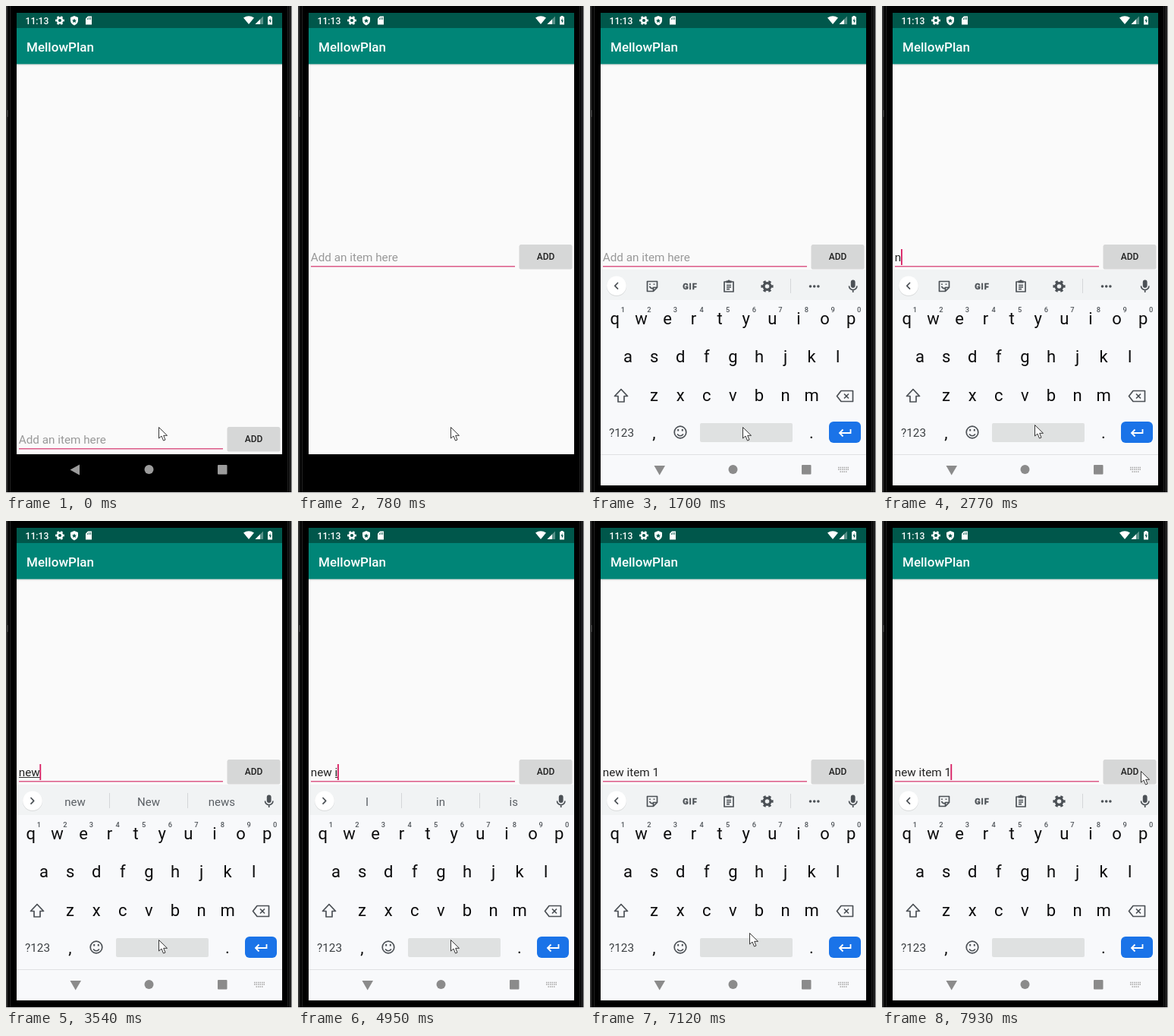
These frames come from a looping animation (377 px wide and 641 px high, 8 s). An HTML page:

```html
<!DOCTYPE html>
<html lang="en">
<head>
<meta charset="utf-8">
<title>Todo app</title>
<style>
html, body { margin: 0; width: 100%; height: 100%; overflow: hidden; background: #000; }
svg { display: block; width: 377px; height: 641px; font-family: Roboto, sans-serif; }
text { white-space: pre; }
.mid { text-anchor: middle; }
.bold { font-weight: 500; }
.line { fill: none; stroke: #4c5156; stroke-width: 1.7; stroke-linejoin: round; }
</style>
</head>
<body>
<svg viewBox="0 0 377 641">
  <defs>
    <linearGradient id="shade" x2="0" y2="1">
      <stop stop-color="#000" stop-opacity=".14"/><stop offset="1" stop-color="#000" stop-opacity="0"/>
    </linearGradient>
  </defs>

  <!-- phone body -->
  <rect width="377" height="641"/>
  <path d="M0 0H3V640H0zM373 0H377V640H373z" fill="#1e1e1e"/>
  <path d="M5.500 0V640M371.500 0V640" stroke="#222"/>
  <path d="M.5 0V640" stroke="#444"/>
  <path d="M376.500 0V640" stroke="#999"/>
  <rect y="137" width="3" height="9" fill="#3a3a3a"/>

  <!-- app -->
  <rect x="14" y="9" width="350" height="581" fill="#fafafa"/>
  <rect x="14" y="9" width="350" height="20" fill="#00574b"/>
  <rect x="14" y="29" width="350" height="47.500" fill="#008577"/>
  <rect x="14" y="76.500" width="350" height="2.500" fill="url(#shade)"/>
  <text x="27" y="60" font-size="17" class="bold" fill="#fff">MellowPlan</text>
  <g id="status" fill="#fff">
    <text x="25.500" y="23.700" font-size="12.200" class="bold">11:13</text>
    <path d="M90 13l5 2v4q0 4-5 6.500q-5-2.500-5-6.500v-4z"/>
    <path d="M90 16.500l1 1.900 2 .2-1.500 1.400.4 2.100-1.900-1.100-1.900 1.100.4-2.100-1.500-1.400 2-.2z" fill="#00574b"/>
    <path d="M108 13.500h5v11h-8v-8z"/>
    <path d="M107.500 16v2M109.500 15v3M111.500 15v3" stroke="#00574b" stroke-width=".8"/>
    <path d="M313 15.500q7-4.500 14 0l-7 8.500z"/>
    <path d="M339 13.500v10.500h-10.500z" opacity=".35"/>
    <path d="M335 17.500v6.500h-6.500z"/>
    <path d="M346.500 13h3v1.200h1.500v10.300h-6v-10.300h1.500z"/>
    <path d="M348.600 16l-2 3.800h1.300v3l2-3.800h-1.300z" fill="#00574b"/>
  </g>

  <!-- input row -->
  <g id="row">
    <path d="M17 342.800H286" stroke="#dc5a88" stroke-width="1.500"/>
    <text id="field" x="16.800" y="335.800" font-size="15.250"></text>
    <path id="under" stroke="#333"/>
    <rect id="caret" y="320" width="1.800" height="21" fill="#d81b60"/>
    <rect x="291.500" y="314.500" width="70" height="32" rx="2" fill="#000" opacity=".14"/>
    <rect x="292" y="314" width="69" height="32" rx="2" fill="#d6d7d7"/>
    <text x="326.500" y="334" font-size="12" class="mid bold" fill="#222">ADD</text>
  </g>

  <!-- dark navigation bar -->
  <rect x="14" y="590" width="350" height="50"/>
  <g id="nav" fill="#9c9c9c">
    <path id="back" d="M84.500 610.500L97 603.500V617.500z"/>
    <circle cx="188.500" cy="610" r="6"/>
    <rect x="279" y="604" width="12.500" height="12.500" rx="1"/>
    <path class="dots" stroke="#9c9c9c"/>
  </g>

  <!-- keyboard -->
  <g id="board">
    <rect x="14" y="347" width="350" height="284" fill="#f8f9fb"/>
    <rect x="14" y="347" width="350" height="40" fill="#f1f3f4"/>
    <rect x="14" y="590" width="350" height="1" fill="#e0e1e2"/>
    <circle cx="35" cy="369" r="13" fill="#000" opacity=".1"/>
    <circle cx="35" cy="368.300" r="12.800" fill="#fff"/>
    <path id="chevron" class="line"/>
    <g id="tools">
      <path class="line" d="M75.500 362.500H88.500V370.500L83.500 375.500H75.500zM88.500 370.500H83.500V375.500M78.500 369q2 4 5 2M79 365.500v1.500M84.500 365.500v1.500"/>
      <text x="132" y="372.500" font-size="11" font-weight="700" letter-spacing="1" class="mid" fill="#4c5156" stroke="#4c5156" stroke-width=".4">GIF</text>
      <path class="line" d="M177 363H189V376H177zM180 367.500H186M180 370H186M180 372.700H184"/>
      <path d="M179.500 361.500h2a1.600 1.600 0 0 1 3 0h2v3h-7z" fill="#4c5156"/>
      <path d="M264.500 359V378" stroke="#d4d6d8"/>
      <g fill="#4c5156"><circle cx="290.500" cy="369" r="1.800"/><circle cx="295.700" cy="369" r="1.800"/><circle cx="300.900" cy="369" r="1.800"/></g>
    </g>
    <g id="hints" font-size="15" class="mid" fill="#5a5f64">
      <path d="M136.500 358V378M239.500 358V378" stroke="#d4d6d8"/>
      <text x="91" y="374.500"></text><text x="188" y="374.500"></text><text x="284.300" y="374.500"></text>
    </g>
    <rect x="343.800" y="360.500" width="5.800" height="10.500" rx="2.900" fill="#4c5156"/>
    <path class="line" d="M341.500 368.500a5.200 5.200 0 0 0 10.400 0M346.700 373.500V377"/>
    <g id="keys" class="mid" fill="#0c0c0d"></g>
    <path class="line" d="M41 504.500L49.500 513.500H45V521H37V513.500H32.500z"/>
    <path class="line" d="M325.500 513.500L331 506.500H346.500V520.500H331zM335 510.500l6 6M341 510.500l-6 6"/>
    <circle class="line" cx="119" cy="561" r="7.800"/>
    <path class="line" d="M115 563.500q4 4.500 8 0"/>
    <path d="M116.200 557v2.600M121.800 557v2.600" stroke="#4c5156" stroke-width="2"/>
    <rect x="145" y="549" width="122" height="25" rx="2" fill="#dfe1e1"/>
    <rect x="315" y="547" width="42" height="28" rx="6" fill="#1a73e8"/>
    <path d="M343.500 557V562H329.500M333.500 557.500L329 562L333.500 566.500" fill="none" stroke="#fff" stroke-width="1.800"/>
    <g fill="#8b8b8b">
      <path d="M84.500 605H99L91.700 617.500z"/>
      <circle cx="188.500" cy="610" r="6"/>
      <rect x="279" y="604" width="12.500" height="12.500" rx="1"/>
      <path class="dots" stroke="#a4a4a4"/>
    </g>
  </g>

  <rect x="14" y="631" width="350" height="9"/>
  <rect y="640" width="377" height="1" fill="#e4e4e4"/>
  <path id="mouse" d="M.5 .5V15L4 12L6.500 18L9 17L6.700 11.300H11.500z" fill="#fff" stroke="#222" stroke-width=".9"/>
</svg>

<script>
const LOOP = 8000;
const $ = id => document.getElementById(id);
const set = (id, attrs) => {
  for (const k in attrs) $(id).setAttribute(k, attrs[k]);
};

function gear(x, y, r, fill, hole) {
  return `<circle cx="${x}" cy="${y}" r="${r * .74}" fill="${fill}"/>
    <circle cx="${x}" cy="${y}" r="${r * .8}" fill="none" stroke="${fill}" stroke-width="${r * .38}"
      pathLength="12" stroke-dasharray="1 1" stroke-dashoffset=".5"/>
    <circle cx="${x}" cy="${y}" r="${r * .34}" fill="${hole}"/>`;
}
const key = (s, x, y, size = 22) => `<text x="${x}" y="${y}" font-size="${size}">${s}</text>`;

function build() {
  $('status').insertAdjacentHTML('beforeend', gear(71, 19, 6, '#fff', '#00574b'));
  $('tools').insertAdjacentHTML('beforeend', gear(233.5, 369, 8.2, '#4c5156', '#f1f3f4'));
  const rows = [['qwertyuiop', 32.8, 419], ['asdfghjkl', 50, 469], ['zxcvbnm', 84.5, 520]];
  let html = `<g fill="#3c4043">${key('?123', 41.5, 567, 15.3)}</g>` + key(',', 84.5, 569) + key('.', 292, 569);
  for (const [letters, x, y] of rows)
    [...letters].forEach((c, i) => html += key(c, x + i * 34.6, y));
  for (let i = 0; i < 10; i++)
    html += `<g class="bold" fill="#50555a">${key((i + 1) % 10, 43.3 + i * 34.6, 402.5, 9.3)}</g>`;
  $('keys').innerHTML = html;
  for (const p of document.querySelectorAll('.dots')) {
    p.setAttribute('d', 'M327 607.500H341M327 610H341M329.500 613H338.500');
    p.setAttribute('stroke-dasharray', '1.5 1');
    p.setAttribute('stroke-width', 1.3);
  }
}

// Each track lists [start ms, ...values]; a value holds until the next step.
const typed = [ // text, caret x
  [0, '', 16.6], [2770, 'n', 25], [2890, 'ne', 33], [3010, 'new', 44.4],
  [4460, 'new ', 48.2], [4710, 'new i', 52], [5090, 'new it', 57],
  [5450, 'new ite', 65], [5810, 'new item', 78.2], [6320, 'new item ', 82.2],
  [6600, 'new item 1', 90.4]
];
const underline = [ // from x, to x
  [0, 0, 0], [2890, 17, 25], [3010, 17, 33], [3260, 17, 45], [4710, 0, 0],
  [4830, 49, 52], [5210, 49, 57], [5570, 49, 65.5], [5950, 49, 79], [6600, 0, 0]
];
const hints = [
  [0, null], [3540, 'new New news'], [4710, 'year one items'], [4950, 'I in is'],
  [5330, 'it its it’s'], [5690, 'ite items item'], [5950, 'item items itemized'],
  [6600, 'for and is'], [6850, ''], [7000, null]
];
const caret = [
  [0, 0], [260, 1], [780, 0], [1170, 1], [1700, 0], [2220, 1],
  [3810, 0], [4320, 1], [7000, 0], [7510, 1]
];
const mouse = [
  [0, 201, 554], [2370, 201, 551], [7120, 210, 542], [7240, 240, 511],
  [7390, 302, 442], [7510, 350, 386], [7660, 365, 358], [7780, 352, 333], [7930, 341, 329]
];
const nav = [ // opacity, back arrow turn, keyboard icon opacity
  [0, 1, 0, 0], [260, 1, -60, .6], [390, 1, -90, 1], [660, .45, -90, 1], [780, 0, -90, 1]
];
const board = [ // opacity, offset y
  [0, 0, 0], [930, .5, 40], [1050, .9, 10], [1170, 1, 0]
];
const at = (track, t) => track.findLast(step => step[0] <= t).slice(1);

function draw(t) {
  const [text, caretX] = at(typed, t);
  $('field').textContent = text || 'Add an item here';
  set('field', { fill: text ? '#222' : '#999' });
  set('row', { transform: `translate(0 ${t < 120 ? 240 : 0})` });
  set('caret', { x: caretX, opacity: at(caret, t)[0] });

  const [from, to] = at(underline, t);
  set('under', { d: `M${from} 337.500H${to}`, opacity: to ? 1 : 0 });

  const [words] = at(hints, t);
  const tools = words === null;
  set('tools', { opacity: tools ? 1 : 0 });
  set('hints', { opacity: words ? 1 : 0 });
  set('chevron', { d: tools ? 'M37 364L32.800 368.300L37 372.600' : 'M32.500 364L36.700 368.300L32.500 372.600' });
  const list = (words || '').split(' ');
  $('hints').querySelectorAll('text').forEach((el, i) => el.textContent = list[i] || '');

  const [navOn, turn, icon] = at(nav, t);
  set('nav', { opacity: navOn });
  set('back', { transform: `rotate(${turn} 91.500 610.500)` });
  $('nav').querySelector('.dots').setAttribute('opacity', icon);

  const [boardOn, drop] = at(board, t);
  set('board', { opacity: boardOn, transform: `translate(0 ${drop})` });

  const [x, y] = at(mouse, t);
  set('mouse', { transform: `translate(${x} ${y})` });
}

build();
const start = performance.now();
function tick() {
  draw((performance.now() - start) % LOOP);
  requestAnimationFrame(tick);
}
tick();
</script>
</body>
</html>
```
